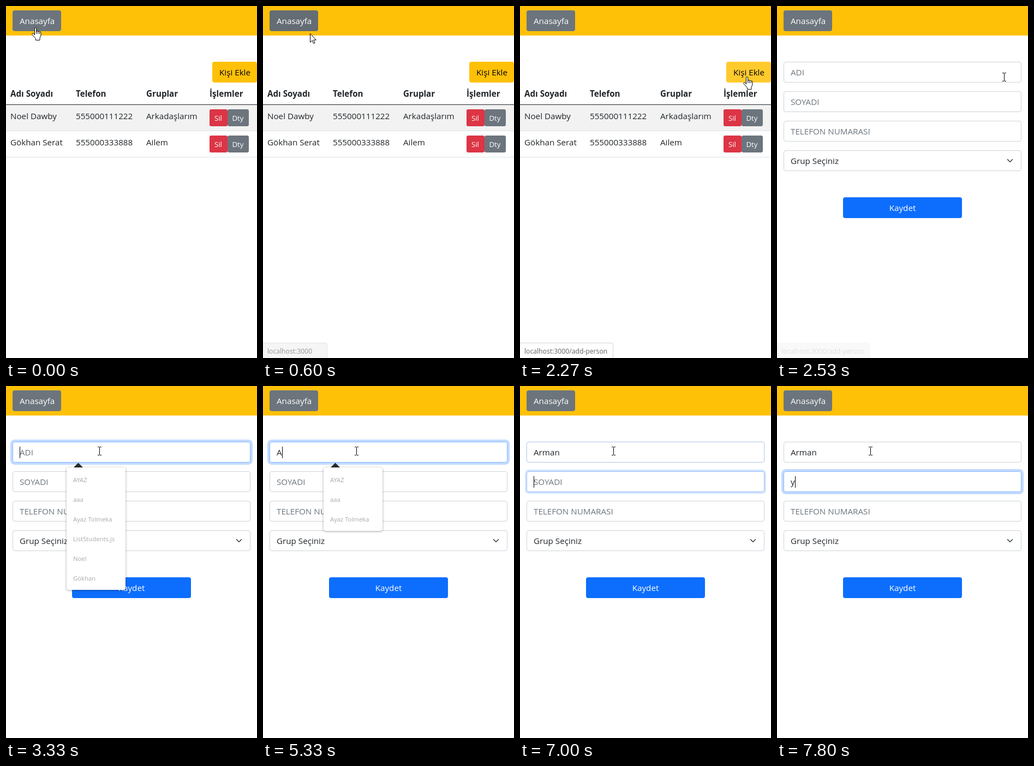
An HTML page with a canvas that plays this animation: 460 by 644 pixels, repeating every 8000 ms.

```html
<!DOCTYPE html>
<html lang="tr">
<head>
<meta charset="utf-8">
<style>
  html, body { margin: 0; width: 100%; height: 100%; overflow: hidden; background: #fff; }
  canvas { display: block; }
</style>
</head>
<body>
<canvas id="stage" width="460" height="644"></canvas>
<script>
const ctx = document.getElementById('stage').getContext('2d');
const LOOP = 8000;
const FPS = 15;
const FONT = '"Open Sans", "Noto Sans", sans-serif';
const INK = '#212529', MUTED = '#6c757d', YELLOW = '#ffc107';

const PEOPLE = [
  ['Noel Dawby', '555000111222', 'Arkadaşlarım'],
  ['Gökhan Serat', '555000333888', 'Ailem']
];
const COLUMNS = [8, 128, 257, 373];
const SUGGESTIONS = ['AYAZ', 'aaa', 'Ayaz Tolmeka', 'ListStudents.js', 'Noel', 'Gökhan'];
const FIRST_KEYS = [[5330, 'A'], [5530, 'r'], [5670, 'm'], [5800, 'a'], [6330, 'n']];
const LAST_KEYS = [[7800, 'y']];
const CARET_OFF = [[3730, 4270], [4730, 5330], [7470, 7800]];
const MOVES = [
  [470, 1130, [54, 39], [373, 147]],
  [1870, 2200, [373, 147], [416, 129]],
  [2670, 3070, [416, 129], [171, 118]]
];
const PAGE_SWAP = 2400, FOCUS_FIRST = 3130, FOCUS_LAST = 6870;

const ARROW = new Path2D('M.5.5V16.5L4.2 13L6.6 18.6L9 17.6L6.6 12.1H11.4Z');
const HAND = new Path2D('M-1.5 14V2.2a1.6 1.6 0 0 1 3.2 0V8.2a1.5 1.5 0 0 1 3 .3a1.4 1.4 0 0 1 2.8.6' +
  'a1.3 1.3 0 0 1 2.5.9V15L8 19.5V23.5H.5V20.5L-5.8 13.5a1.6 1.6 0 0 1 2.2-2.3Z');
const KNUCKLES = new Path2D('M1.7 8V12M4.7 8.5V12M7.5 9.5V12');

const ramp = (t, from, to) => Math.min(1, Math.max(0, (t - from) / (to - from)));
const ease = p => p * p * (3 - 2 * p);
const pulse = (t, a, b, c, d) => ramp(t, a, b) - ramp(t, c, d);
const typed = (keys, t) => keys.filter(k => t >= k[0]).map(k => k[1]).join('');
const mix = (a, b, p) => `rgb(${a.map((v, i) => Math.round(v + (b[i] - v) * p))})`;

function text(str, x, y, color = INK, size = 15.2, weight = 400, align = 'left') {
  ctx.font = `${weight} ${size}px ${FONT}`;
  ctx.textAlign = align;
  ctx.fillStyle = color;
  ctx.fillText(str, x, y);
}

function box(x, y, w, h, r, fill) {
  ctx.beginPath();
  ctx.roundRect(x, y, w, h, r);
  ctx.fillStyle = fill;
  ctx.fill();
}

function faded(alpha, draw) {
  if (alpha <= 0) return;
  ctx.save();
  ctx.globalAlpha = alpha;
  draw();
  ctx.restore();
}

function navbar(t) {
  box(0, 0, 460, 54, 0, YELLOW);
  const hover = pulse(t, 0, 200, 530, 670);
  box(12, 8, 89, 38, 4, mix([108, 117, 125], [92, 99, 106], hover));
  text('Anasayfa', 25, 33, '#fff');
}

function listPage(t) {
  box(378, 102, 82, 38, 4, mix([255, 193, 7], [255, 202, 44], ramp(t, 1930, 2130)));
  text('Kişi Ekle', 391, 127, '#000');
  ['Adı Soyadı', 'Telefon', 'Gruplar', 'İşlemler'].forEach((s, i) =>
    text(s, COLUMNS[i], 166, INK, 15.2, 700));
  box(0, 181, 460, 47, 0, '#f2f2f2');
  box(0, 180, 460, 1, 0, INK);
  PEOPLE.forEach((person, row) => {
    const y = 181 + row * 48;
    person.forEach((s, i) => text(s, COLUMNS[i], y + 26));
    box(0, y + 47, 460, 1, 0, '#dee2e6');
    box(373, y + 8, 33, 31, 3.2, '#dc3545');
    box(406, y + 8, 39, 31, 3.2, MUTED);
    text('Sil', 382, y + 29, '#fff', 13.2);
    text('Dty', 414.5, y + 29, '#fff', 13.2);
  });
}

function field(y, placeholder, value = '', focus = 0) {
  if (focus > 0) {
    const ring = 4 * focus;
    box(12 - ring, y - ring, 436 + 2 * ring, 38 + 2 * ring, 4 + ring, `rgba(13,110,253,${0.25 * focus})`);
  }
  box(12, y, 436, 38, 4, '#fff');
  ctx.beginPath();
  ctx.roundRect(12.5, y + 0.5, 435, 37, 3.5);
  ctx.strokeStyle = mix([206, 212, 218], [134, 183, 254], focus);
  ctx.lineWidth = 1;
  ctx.stroke();
  text(value || placeholder, 25, y + 25, value ? INK : MUTED);
}

function caret(t, y, value) {
  if (CARET_OFF.some(([from, to]) => t >= from && t < to)) return;
  ctx.font = `400 15.2px ${FONT}`;
  box(Math.round(25 + ctx.measureText(value).width), y + 9, 1, 21, 0, '#000');
}

function suggestions(t) {
  const items = t < 5330 ? SUGGESTIONS : SUGGESTIONS.slice(0, 3);
  faded(pulse(t, 3130, 3330, 5460, 5600), () => {
    ctx.fillStyle = '#2b2b2b';
    ctx.fill(new Path2D('M123.5 149.5L132.5 140.5L141.5 149.5Z'));
    ctx.save();
    ctx.shadowColor = 'rgba(0,0,0,.35)';
    ctx.shadowBlur = 4;
    ctx.shadowOffsetY = 1;
    box(111, 149, 108, items.length * 36 + 8, 4, '#fff');
    ctx.restore();
    items.forEach((s, i) => text(s, 123, 176 + i * 36, '#aaa', 11.3));
  });
}

function formPage(t) {
  const first = typed(FIRST_KEYS, t), last = typed(LAST_KEYS, t);
  field(102, 'ADI', first, pulse(t, 3070, 3270, 6810, 7070));
  field(156, 'SOYADI', last, ramp(t, 6810, 7070));
  field(210, 'TELEFON NUMARASI');
  field(264, '', 'Grup Seçiniz');
  ctx.strokeStyle = '#343a40';
  ctx.lineWidth = 1.5;
  ctx.lineCap = ctx.lineJoin = 'round';
  ctx.stroke(new Path2D('M422.5 280.75l4.5 4.5 4.5-4.5'));
  box(121, 350, 218, 38, 4, '#0d6efd');
  text('Kaydet', 230, 375, '#fff', 15.2, 400, 'center');
  if (t >= FOCUS_LAST) caret(t, 156, last);
  else if (t >= FOCUS_FIRST) caret(t, 102, first);
  suggestions(t);
}

function statusBar(label, width, alpha) {
  faded(alpha, () => {
    box(0, 616, width, 28, [0, 4, 0, 0], '#d5d5d5');
    box(0, 617, width - 1, 27, [0, 3, 0, 0], '#fff');
    text(label, 8, 636, '#5f6368', 12.2);
  });
}

function pointer(t) {
  let [x, y] = MOVES[0][2];
  for (const [start, end, from, to] of MOVES) {
    if (t < start) break;
    const p = ease(ramp(t, start, end));
    x = Math.round(from[0] + (to[0] - from[0]) * p);
    y = Math.round(from[1] + (to[1] - from[1]) * p);
  }
  ctx.save();
  ctx.translate(x, y);
  if (t >= PAGE_SWAP) {
    [[-3, -7, 3], [1, -7, 3], [0, -6, 1], [-3, 8, 3], [1, 8, 3]].forEach(([bx, by, w]) =>
      box(bx, by, w, w === 1 ? 14 : 1, 0, '#000'));
  } else {
    const overHome = x < 101 && y < 46;
    const overAdd = x >= 378 && y >= 102 && y < 140;
    const hand = overHome || overAdd;
    const shape = hand ? HAND : ARROW;
    ctx.fillStyle = '#fff';
    ctx.strokeStyle = '#000';
    ctx.lineWidth = 1;
    ctx.lineJoin = 'miter';
    ctx.fill(shape);
    ctx.stroke(shape);
    if (hand) ctx.stroke(KNUCKLES);
  }
  ctx.restore();
}

function render(now) {
  const step = Math.floor((now % LOOP + 4) * FPS / 1000);
  const t = Math.round(step * 100 / FPS) * 10 % LOOP;
  box(0, 0, 460, 644, 0, '#fff');
  navbar(t);
  (t < PAGE_SWAP ? listPage : formPage)(t);
  statusBar('localhost:3000', 118, pulse(t, 0, 330, 530, 730));
  statusBar('localhost:3000/add-person', 171, pulse(t, 2000, 2200, 2330, 2570));
  pointer(t);
}

const begin = performance.now();
function loop() {
  render(performance.now() - begin);
  requestAnimationFrame(loop);
}
loop();
</script>
</body>
</html>
```
